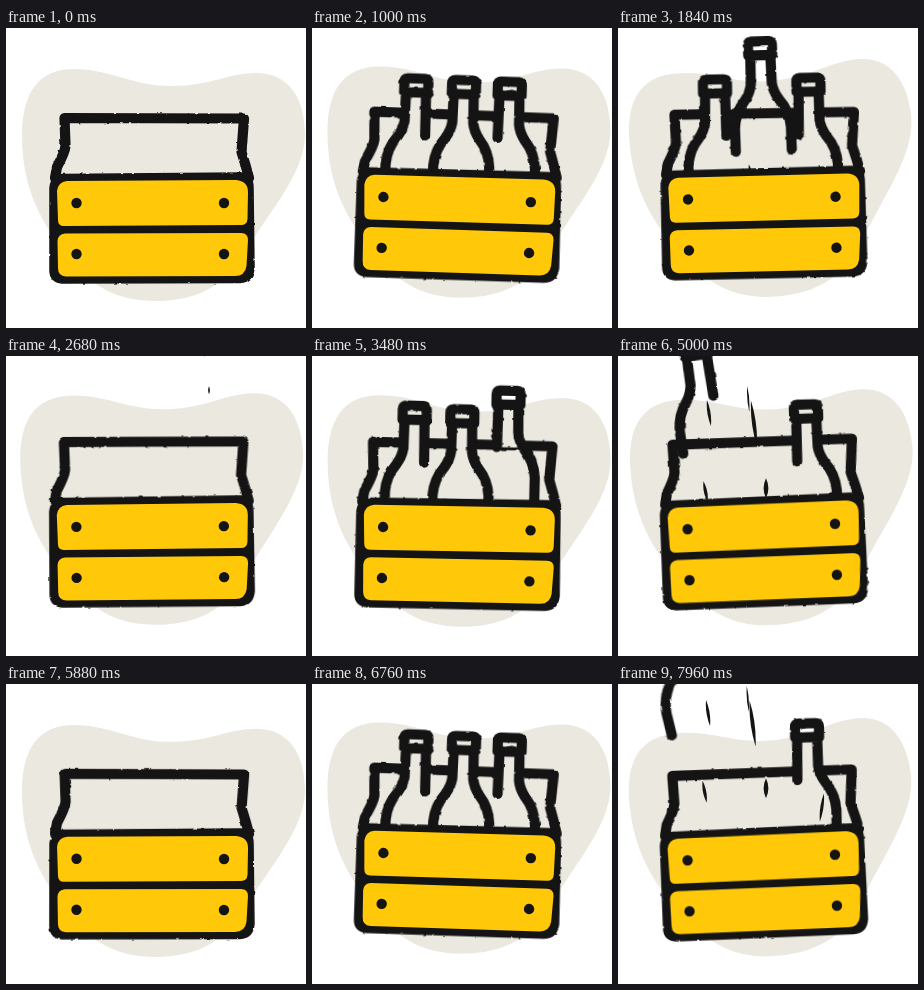
An HTML page for the animation above (8 s loop, 300 px wide and 300 px high).

```html
<!DOCTYPE html>
<html lang="en">
<head>
<meta charset="utf-8">
<title>Bottle crate</title>
<style>
  html, body { margin: 0; width: 100%; height: 100%; overflow: hidden; background: #fff; }
  svg { display: block; width: 100%; height: 100%; }
  .ink { fill: none; stroke: #141414; stroke-width: 10.2; stroke-linecap: round; stroke-linejoin: round; }
</style>
</head>
<body>
<svg viewBox="0 0 300 300">
  <defs>
    <filter id="rough" filterUnits="userSpaceOnUse" x="0" y="-60" width="300" height="400" color-interpolation-filters="sRGB">
      <feTurbulence id="noise" type="fractalNoise" baseFrequency=".16" numOctaves="2"/>
      <feDisplacementMap in="SourceGraphic" scale="2.4" xChannelSelector="R" yChannelSelector="G"/>
    </filter>
    <clipPath id="above"><rect x="-100" y="-300" width="500" height="490"/></clipPath>
    <mask id="behind" maskUnits="userSpaceOnUse" x="0" y="0" width="300" height="300">
      <rect width="300" height="300" fill="#fff"/>
      <g id="necks"></g>
    </mask>
  </defs>
  <path id="heart" fill="#ebe8e0" d="M68 41C105 41 125 58 165 58C205 58 222 45 250 45C283 45 299 70 299 108C298 148 260 187 230 238C208 265 180 273 150 273C110 273 85 258 62 228C35 195 16 160 16 108C16 65 32 41 68 41Z"/>
  <g id="crate">
    <g filter="url(#rough)">
      <g mask="url(#behind)">
        <path class="ink" d="M49 150L51 139Q59 124 59.5 118L58.500 90L238 90.500L235.500 124Q240 138 243 150"/>
      </g>
      <g id="bottles" clip-path="url(#above)"></g>
      <path fill="#141414" stroke="#141414" stroke-width="1.5" d="M56 146.500L235 145Q247 146 247 160L248 240Q247 254 234 254.500L56 255Q44 254 44 242L44 160Q45 148 56 146.500Z"/>
    </g>
    <g fill="#ffc90a">
      <path d="M61 153L230 152Q242 153 242 164L241.500 191Q241 197 235 197L58 198Q52 198 52 192L51 163Q52 154 61 153Z"/>
      <path d="M59 205.500L235 205Q242 205 242 212L240.500 238Q239 248 229 248L60 248.500Q52 248 52 240L51.500 213Q52 206 59 205.500Z"/>
    </g>
    <g fill="#141414">
      <circle cx="70.500" cy="175" r="5.200"/><circle cx="218" cy="175" r="5.200"/>
      <circle cx="70.500" cy="226" r="5.200"/><circle cx="218" cy="226" r="5.200"/>
    </g>
  </g>
  <path id="streaks" fill="#141414"/>
</svg>
<script>
const LOOP = 8000, PERIOD = 2880;
const $ = id => document.getElementById(id);

// time, lift, crate angle, heart angle
const POSES = [
  [0, 0, 0, 0], [1000, -3.5, 2, -0.6], [1320, -5, 1.1, -6], [1480, -5.5, 0.5, -7.5],
  [2120, -4.5, -2.1, -4.6], [2200, -1.5, -2.2, -6], [2680, -4.5, -0.3, -2], [PERIOD, 0, 0, 0]
];

const side = s => `M${s * 10} 68L${s * 10.5} 98Q${s * 11.5} 106 ${s * 17} 114Q${s * 27} 126 ${s * 28} 142V165`;
const stub = s => `M${s * 10} 68L${s * 10.5} 112`;
const CAP = 'M-9 55.500H9Q12 55.500 12 59V69.500H-12V59Q-12 55.500 -9 55.500Z';

// x, entry time, launch time, lean, outline
const BOTTLES = [
  { x: 99.5, enter: 240, leave: 1876, lean: -1, d: side(-1) + stub(1) },
  { x: 193, enter: 360, leave: 2095, lean: 1, d: stub(-1) + side(1) },
  { x: 147.2, enter: 120, leave: 1660, lean: -0.3, d: side(-1) + side(1) }
];

// x, start time, length, half width, slant
const STREAKS = [
  [94, 1855, 26, 1.6, 4], [88, 2080, 22, 1.7, 4],
  [132, 1815, 26, 1, 2], [140, 1885, 46, 2, 6], [148, 2070, 20, 2.4, 0],
  [203, 2125, 28, 1.6, -4], [196, 2210, 32, 1.5, -3], [203, 2350, 8, 0.9, 0]
];

function add(parent, name, attrs) {
  const el = document.createElementNS('http://www.w3.org/2000/svg', name);
  for (const key in attrs) el.setAttribute(key, attrs[key]);
  return parent.appendChild(el);
}

for (const b of BOTTLES) {
  b.el = add($('bottles'), 'path', { class: 'ink', d: CAP + b.d });
  b.neck = add($('necks'), 'path', { d: 'M-11 55H11V112H-11Z' });
}

function poseAt(t) {
  const i = POSES.findIndex(p => p[0] > t);
  const a = POSES[i - 1], b = POSES[i];
  const k = (1 - Math.cos(Math.PI * (t - a[0]) / (b[0] - a[0]))) / 2;
  return a.map((v, j) => v + (b[j] - v) * k);
}

function backOut(k) {
  const s = 2.5, u = k - 1;
  return 1 + (s + 1) * u ** 3 + s * u * u;
}

function placeBottle(b, t) {
  const k = Math.min(1, Math.max(0, (t - b.enter) / 400));
  const sink = 112 * (1 - backOut(k));
  const rise = 0.00114 * Math.max(0, t - b.leave) ** 2;
  const shown = k > 0 && rise < 330;
  const dx = b.lean * 0.0012 * rise * rise;
  const turn = b.lean * Math.min(20, 0.095 * rise);
  const move = `translate(${b.x + dx} ${sink - rise}) rotate(${turn} 0 140)`;
  for (const el of [b.el, b.neck]) {
    el.setAttribute('transform', move);
    el.setAttribute('visibility', shown ? 'visible' : 'hidden');
  }
}

function streakPath([x, start, len, w, slant], t) {
  const age = t - start;
  if (age < 0 || age > 520) return '';
  const y = 150 - 0.35 * age;
  const h = Math.min(len / 2, Math.max(0, (145 - y) * 1.1));
  const cx = x - slant * age / 350;
  const top = `${cx - slant / 2} ${y - h}`, end = `${cx + slant / 2} ${y + h}`;
  return `M${top}Q${cx + 2 * w} ${y} ${end}Q${cx - 2 * w} ${y} ${top}Z`;
}

function draw(time) {
  const t = time % LOOP % PERIOD;
  const [, lift, tilt, sway] = poseAt(t);
  $('heart').setAttribute('transform', `translate(0 ${lift}) rotate(${sway} 157 157)`);
  $('crate').setAttribute('transform', `translate(0 ${lift}) rotate(${tilt} 144 200.5)`);
  BOTTLES.forEach(b => placeBottle(b, t));
  $('streaks').setAttribute('d', STREAKS.map(s => streakPath(s, t)).join(''));
  $('noise').setAttribute('seed', 1 + Math.floor(t / 120));
}

const begin = performance.now();
function tick() {
  draw(performance.now() - begin);
  requestAnimationFrame(tick);
}
tick();
</script>
</body>
</html>
```
